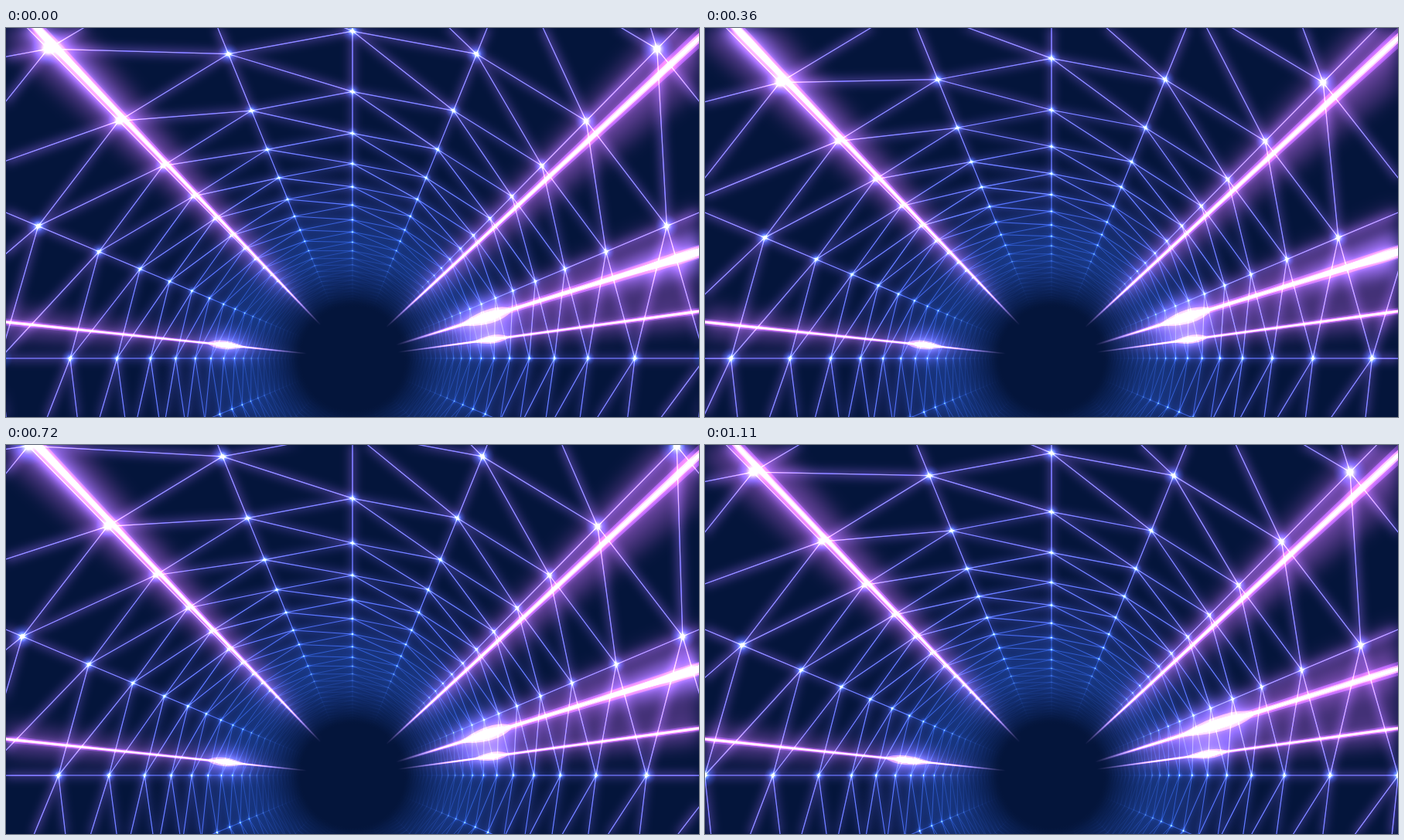
An HTML page with a canvas that plays this animation: 896x504 px, repeating every 1140 ms.

```html
<!DOCTYPE html>
<html lang="en">
<head>
<meta charset="utf-8">
<title>Neon tunnel</title>
<style>
html, body { margin: 0; width: 100%; height: 100%; overflow: hidden; background: #04153b; }
canvas { display: block; width: 896px; height: 504px; }
</style>
</head>
<body>
<canvas id="stage" width="896" height="504"></canvas>
<script>
const W = 896, H = 504, CX = 448, CY = 428;
const LOOP = 1140, STEP = 30, SPOKES = 16, RINGS = 25;
const BG = '4,21,59';
const ctx = document.getElementById('stage').getContext('2d');

// dx, dy: direction; core, halo: half widths per pixel of distance
// pulses: [tail, length, speed, width], measured in 1/|dx| and per step
const beams = [
  { dx: -1, dy: -1.05, core: .006, halo: .075, power: 1, pulses: [[.01826, .0026, .00122, .028]] },
  { dx: 1, dy: -.926, core: .007, halo: .085, power: 1, pulses: [[.0235, .0021, .0023, .05]] },
  { dx: 1, dy: -.308, core: .008, halo: .12, power: 1, pulses: [[.007, .0019, .0011, .034], [.0162, .0027, .0011, .044]] },
  { dx: 1, dy: -.136, core: .004, halo: .05, power: .8, pulses: [[.0062, .001, .0006, .02]] },
  { dx: -1, dy: -.105, core: .004, halo: .05, power: .8, pulses: [[.007, .0014, .0007, .022]] }
];

const mod = (a, b) => ((a % b) + b) % b;
const clamp = v => Math.max(0, Math.min(1, v));
const mix = (a, b, m) => a.map((v, i) => Math.round(v + (b[i] - v) * m));
const rgba = (c, a) => `rgba(${c},${a})`;

function layer(scale) {
  const c = document.createElement('canvas');
  c.width = W * scale;
  c.height = H * scale;
  const g = c.getContext('2d');
  g.scale(scale, scale);
  g.globalCompositeOperation = 'lighter';
  return g;
}
const glow = layer(.5), halo = layer(.5), mesh = layer(1), light = layer(1);

function radial(g, x, y, r, stops) {
  const grad = g.createRadialGradient(x, y, 0, x, y, r);
  stops.forEach(([at, color]) => grad.addColorStop(at, color));
  return grad;
}

const spark = document.createElement('canvas');
spark.width = spark.height = 96;
{
  const g = spark.getContext('2d');
  g.fillStyle = radial(g, 48, 48, 48, [
    [0, 'rgba(255,255,255,1)'], [.1, 'rgba(225,240,255,1)'], [.22, 'rgba(90,150,255,.6)'],
    [.45, 'rgba(45,95,215,.25)'], [1, 'rgba(35,65,180,0)']
  ]);
  g.fillRect(0, 0, 96, 96);
}

const fog = radial(ctx, CX, CY, 260, [
  [0, 'rgba(38,74,165,.45)'], [.5, 'rgba(38,74,165,.42)'], [.75, 'rgba(44,64,150,.2)'], [1, 'rgba(60,50,130,0)']
]);
const hole = radial(ctx, CX, CY, 160, [
  [0, rgba(BG, 1)], [.42, rgba(BG, 1)], [.55, rgba(BG, .74)], [.72, rgba(BG, .36)], [.88, rgba(BG, .1)], [1, rgba(BG, 0)]
]);

// Depth shifts with height because the camera looks slightly upward.
function node(ring, spoke, phase) {
  const a = spoke * 2 * Math.PI / SPOKES;
  const u = ring + phase + .379 * Math.cos(a);
  return { x: CX + 1835 * Math.sin(a) / u, y: CY - 1868 * Math.cos(a) / u, u };
}

function drawMesh(phase) {
  const rows = [];
  for (let k = 1; k <= RINGS; k++) {
    rows.push(Array.from({ length: SPOKES + 1 }, (_, j) => node(k, j, phase)));
  }
  for (let k = RINGS - 2; k >= 0; k--) {
    const u = k + 1 + phase, path = new Path2D();
    for (let j = 0; j < SPOKES; j++) {
      const p = rows[k][j];
      for (const q of [rows[k][j + 1], rows[k + 1][j], rows[k + 1][j + 1]]) {
        path.moveTo(p.x, p.y);
        path.lineTo(q.x, q.y);
      }
    }
    const far = clamp((u - 4) / 7);
    glow.lineWidth = 30 / Math.max(u, 3);
    glow.strokeStyle = rgba(mix([88, 50, 108], [24, 46, 104], far), 1);
    glow.stroke(path);
    mesh.lineWidth = 1 + .25 * (1 - far);
    mesh.strokeStyle = rgba(mix([128, 116, 228], [52, 92, 196], far), Math.min(.9, 50 / (u * u)));
    mesh.stroke(path);
  }
  for (const row of rows) {
    for (const p of row.slice(0, SPOKES)) {
      if (p.u > 16 || p.u < 2 || p.x < -60 || p.x > W + 60 || p.y < -60 || p.y > H + 60) continue;
      const r = 3 + 215 / (p.u * p.u);
      mesh.globalAlpha = clamp((16 - p.u) / 8);
      mesh.drawImage(spark, p.x - r, p.y - r, 2 * r, 2 * r);
    }
  }
  mesh.globalAlpha = 1;
}

// Fills a wedge along a beam that widens with distance.
function wedge(g, b, half, color, alpha) {
  const n = Math.hypot(b.dx, b.dy), far = 700;
  const x = b.dx / n, y = b.dy / n, near = .5, w = near + half * far;
  g.fillStyle = radial(g, CX, CY, far, [
    [0, rgba(color, 0)], [.085, rgba(color, 0)], [.2, rgba(color, alpha)], [1, rgba(color, alpha)]
  ]);
  g.beginPath();
  g.moveTo(CX - y * near, CY + x * near);
  g.lineTo(CX + x * far - y * w, CY + y * far + x * w);
  g.lineTo(CX + x * far + y * w, CY + y * far - x * w);
  g.lineTo(CX + y * near, CY - x * near);
  g.fill();
}

// Spindle of light between two distances on a beam.
function spindle(g, b, d0, d1, half, color) {
  const n = Math.hypot(b.dx, b.dy), x = b.dx / n, y = b.dy / n;
  const at = (d, w) => [CX + x * d * n - y * w, CY + y * d * n + x * w];
  const mid = d0 + (d1 - d0) * .65;
  const w = half * Math.sqrt(200 * Math.min(mid, 450));
  g.fillStyle = color;
  g.beginPath();
  g.moveTo(...at(d0, 0));
  g.quadraticCurveTo(...at(mid, w * 1.7), ...at(d1, w * .3));
  g.lineTo(...at(d1, -w * .3));
  g.quadraticCurveTo(...at(mid, -w * 1.7), ...at(d0, 0));
  g.fill();
}

function drawBeams(n) {
  for (const b of beams) {
    wedge(halo, b, b.halo, '72,32,68', b.power);
    wedge(halo, b, b.halo * .4, '66,34,70', b.power);
    wedge(light, b, b.core * 2.2, '80,32,92', .7 * b.power);
    wedge(light, b, b.core, '172,84,165', b.power);
    wedge(light, b, b.core * .4, '90,130,90', b.power);
    for (const [start, len, speed, half] of b.pulses) {
      const tail = mod(start - speed * n, speed * 12);
      const d0 = 1 / Math.max(tail, .0005);
      if (d0 < 95 || d0 > 620) continue;
      const d1 = Math.min(1100, 1 / Math.max(tail - len, .0001));
      spindle(halo, b, d0 * .9, d1 * 1.06, half * 4.5, 'rgba(78,68,150,.9)');
      spindle(light, b, d0 * .96, d1 * 1.04, half * 1.5, 'rgba(170,105,215,.5)');
      spindle(light, b, d0, d1, half * .9, 'rgba(255,240,255,1)');
    }
  }
}

function render(n) {
  for (const g of [glow, halo, mesh, light]) g.clearRect(0, 0, W, H);
  drawMesh(mod(.027 - n * 2 / 15, 1));
  drawBeams(n);

  const add = (g, blur, alpha) => {
    ctx.filter = blur ? `blur(${blur}px)` : 'none';
    ctx.globalAlpha = alpha;
    ctx.drawImage(g.canvas, 0, 0, W, H);
    ctx.filter = 'none';
    ctx.globalAlpha = 1;
  };
  ctx.globalCompositeOperation = 'source-over';
  ctx.fillStyle = rgba(BG, 1);
  ctx.fillRect(0, 0, W, H);
  ctx.fillStyle = fog;
  ctx.fillRect(0, 0, W, H);
  ctx.globalCompositeOperation = 'lighter';
  add(glow, 6, .75);
  add(halo, 11, .8);
  add(mesh, 2.5, .25);
  add(mesh, 0, 1);
  ctx.globalCompositeOperation = 'source-over';
  ctx.fillStyle = hole;
  ctx.fillRect(0, 0, W, H);
  ctx.globalCompositeOperation = 'lighter';
  add(light, 4, .4);
  add(light, .7, 1);
}

let shown = -1;
function tick() {
  const n = Math.floor((performance.now() % LOOP) / STEP);
  if (n !== shown) render(shown = n);
  requestAnimationFrame(tick);
}
tick();
</script>
</body>
</html>
```
